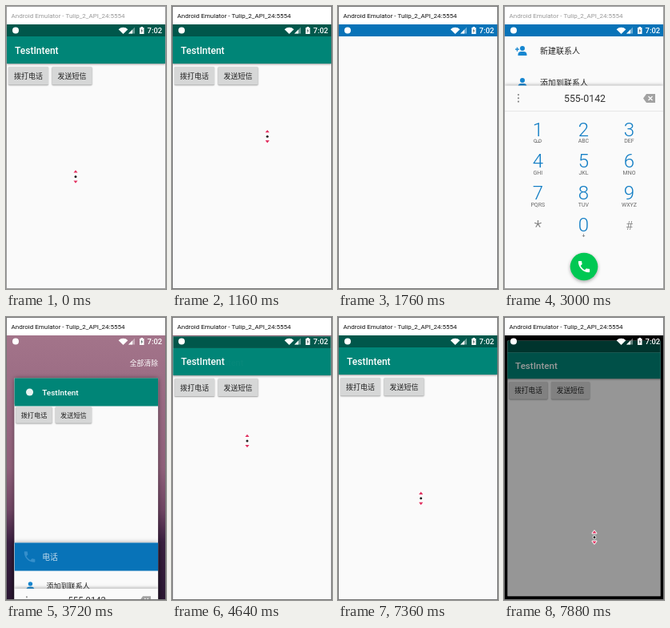
Recreate the animation shown at these times as an HTML page with a canvas. Size 200 by 354 pixels, loop 8000 ms.

```html
<!DOCTYPE html>
<html lang="zh">
<head>
<meta charset="utf-8">
<style>
html, body { margin: 0; width: 100%; height: 100%; overflow: hidden; background: #fff; }
canvas { display: block; width: 200px; height: 354px; }
</style>
</head>
<body>
<canvas id="stage"></canvas>
<script>
const LOOP = 8000, W = 200, H = 354;
const canvas = document.getElementById('stage');
const ctx = canvas.getContext('2d');
const dpr = window.devicePixelRatio || 1;
canvas.width = W * dpr;
canvas.height = H * dpr;

const LATIN = 'Roboto, sans-serif';
const CJK = '"Noto Sans CJK SC", "Noto Sans CJK", "Noto Sans CJK JP", sans-serif';
const CALL = new Path2D('M6.6 10.8c1.4 2.8 3.8 5.1 6.6 6.6l2.2-2.2c.3-.3.7-.4 1-.2 1.1.4 2.3.6 3.6.6.6 0 1 .4 1 1V20c0 .6-.4 1-1 1C10.6 21 3 13.4 3 4c0-.6.4-1 1-1h3.5c.6 0 1 .4 1 1 0 1.2.2 2.5.6 3.6.1.3 0 .7-.3 1z');

// Each stretch holds its pictures for 80 ms, counted from its own start.
const STRETCHES = [0, 440, 1440, 3000, 4000, 5400, 6960, 7880];

// Pointer keys: time, x, y
const POINTER = [
  [0, 87, 213.5], [79, 87, 213.5], [80, 60, 140], [160, 46, 104], [439, 46, 104],
  [520, 44, 88], [840, 44, 88], [1240, 138, 182], [1440, 149, 190], [1640, 212, 215],
  [3720, 212, 235], [4080, 94, 155], [4640, 94, 155], [5040, 71, 83],
  [5200, 81, 82], [5400, 78, 73], [5559, 78, 73], [5640, 78, 84], [6279, 78, 84],
  [6280, 80, 84], [6760, 80, 84], [7280, 102, 218], [7800, 113, 275.5], [8000, 113, 275.5]
];

const clamp = v => Math.max(0, Math.min(1, v));
const span = (t, from, to) => clamp((t - from) / (to - from));
const mix = (a, b, p) => a + (b - a) * p;
const easeOut = p => 1 - (1 - p) ** 3;
const easeInOut = p => p < .5 ? 4 * p ** 3 : 1 - 4 * (1 - p) ** 3;

function holdTime(t) {
  const start = STRETCHES.filter(s => s <= t).pop();
  return Math.min(7880, start + Math.floor((t - start) / 80) * 80);
}

function rect(x, y, w, h, color) {
  ctx.fillStyle = color;
  ctx.fillRect(x, y, w, h);
}

function circle(x, y, r, color) {
  ctx.fillStyle = color;
  ctx.beginPath();
  ctx.arc(x, y, r, 0, Math.PI * 2);
  ctx.fill();
}

function polygon(points, color) {
  ctx.fillStyle = color;
  ctx.beginPath();
  points.forEach(([x, y]) => ctx.lineTo(x, y));
  ctx.closePath();
  ctx.fill();
}

function text(str, x, y, font, color, align = 'left') {
  ctx.font = font;
  ctx.fillStyle = color;
  ctx.textAlign = align;
  ctx.fillText(str, x, y);
}

function group(draw, alpha = 1) {
  ctx.save();
  ctx.globalAlpha *= alpha;
  draw();
  ctx.restore();
}

function withShadow(blur, y, alpha, draw) {
  group(() => {
    ctx.shadowColor = `rgba(0,0,0,${alpha})`;
    ctx.shadowBlur = blur * dpr;
    ctx.shadowOffsetY = y * dpr;
    draw();
  });
}

// Places a full-screen window with its top left corner at x, y.
function place(x, y, scale, draw) {
  group(() => {
    ctx.translate(x, y);
    ctx.scale(scale, scale);
    ctx.translate(-1, -23);
    draw();
  });
}

function callIcon(x, y, size, color) {
  group(() => {
    ctx.translate(x - size / 2, y - size / 2);
    ctx.scale(size / 24, size / 24);
    ctx.fillStyle = color;
    ctx.fill(CALL);
  });
}

function button(x, label, ripple) {
  group(() => {
    ctx.beginPath();
    ctx.roundRect(x, 76, 50, 22.5, 1.2);
    withShadow(1.5, .8, .4, () => { ctx.fillStyle = '#d6d7d7'; ctx.fill(); });
    ctx.clip();
    if (ripple) circle(ripple.x, ripple.y, ripple.r, `rgba(0,0,0,${ripple.alpha})`);
  });
  text(label, x + 25, 90.8, `9px ${CJK}`, '#222', 'center');
}

function rippleAt(t, press, release, x, y) {
  if (t < press || t > release + 480) return null;
  const spread = span(t, release, release + 240);
  return {
    x, y,
    r: mix(9.5 * span(t, press - 80, press + 80), 50, spread),
    alpha: .16 * (1 - span(t, release + 200, release + 480))
  };
}

function testApp(t) {
  rect(1, 23, 198, 331, '#fafafa');
  rect(1, 23, 198, 15, '#00574b');
  withShadow(2, 1, .4, () => rect(1, 38, 198, 34, '#008577'));
  text('TestIntent', 11, 59.5, `500 12px ${LATIN}`, '#fff');
  button(3, '拨打电话', rippleAt(t, 520, 600, 44, 88));
  button(57.5, '发送短信', rippleAt(t, 6280, 6520, 79.5, 84));
}

function person(x, y, plus) {
  const blue = '#1686d0';
  circle(x, y - 3, 3, blue);
  ctx.beginPath();
  ctx.roundRect(x - 5.5, y + 1, 11, 5, [4, 4, 0, 0]);
  ctx.fill();
  if (plus) {
    rect(x - 9, y - 2.5, 5, 1.3, blue);
    rect(x - 7.2, y - 4.3, 1.3, 5, blue);
  }
}

function keypad() {
  const letters = ['', 'ABC', 'DEF', 'GHI', 'JKL', 'MNO', 'PQRS', 'TUV', 'WXYZ', '', '+', ''];
  [...'123456789*0#'].forEach((key, i) => {
    const x = 42.3 + (i % 3) * 57.1, y = 162.5 + Math.floor(i / 3) * 39.8;
    if (key === '*') text(key, x, y + 2, `300 22px ${LATIN}`, '#777', 'center');
    else if (key === '#') text(key, x, y - 2, `300 15px ${LATIN}`, '#777', 'center');
    else text(key, x, y, `300 24px ${LATIN}`, '#0f7cc4', 'center');
    text(letters[i], x, y + 8.5, `7px ${LATIN}`, '#666', 'center');
  });
  ctx.strokeStyle = '#777';
  ctx.lineWidth = .8;
  ctx.beginPath();
  ctx.arc(39, 168.7, 1.8, 0, 7);
  ctx.moveTo(46.8, 168.7);
  ctx.arc(45, 168.7, 1.8, 0, 7);
  ctx.moveTo(39, 170.5);
  ctx.lineTo(45, 170.5);
  ctx.stroke();
}

function dialer(t) {
  const shown = span(t, 2240, 2480);
  rect(1, 23, 198, 331, '#fafafa');
  rect(1, 23, 198, 15, '#0873b8');
  if (!shown) return;
  group(() => {
    person(23, 56, true);
    text('新建联系人', 45, 60, `10px ${CJK}`, '#222');
    person(23, 96, false);
    text('添加到联系人', 45, 100, `10px ${CJK}`, '#222');
    withShadow(4, -1, .35, () => rect(1, 99.5, 198, 254.5, '#fafafa'));
    rect(1, 131, 198, .8, '#e2e2e2');
    [111, 115.3, 119.6].forEach(y => circle(18, y, 1.1, '#888'));
    text('555-0142', 101, 120, `12.4px ${LATIN}`, '#333', 'center');
    polygon([[174, 115.5], [178, 110], [189, 110], [189, 121], [178, 121]], '#a2a2a2');
    ctx.strokeStyle = '#fff';
    ctx.lineWidth = 1.2;
    ctx.beginPath();
    ctx.moveTo(180.5, 113); ctx.lineTo(185.5, 118);
    ctx.moveTo(185.5, 113); ctx.lineTo(180.5, 118);
    ctx.stroke();
    keypad();
    withShadow(4, 1.5, .35, () => circle(100, 326, 17.3 * shown, '#00c853'));
    callIcon(100, 326, 19 * shown, '#fff');
  }, shown);
}

// Overview card: a window whose top strip gives way to a coloured header.
const HEAD_TOP = 13.5, HEAD_BOTTOM = 52;

function card(x, y, scale, amount, head, drawWindow) {
  place(x, y, scale, () => {
    const top = 23 + HEAD_TOP * amount;
    withShadow(6, 0, .5, () => rect(1, top, 198, 400, '#fafafa'));
    ctx.beginPath();
    ctx.rect(1, top, 198, 400);
    ctx.clip();
    drawWindow();
    group(() => {
      const middle = 23 + (HEAD_TOP + HEAD_BOTTOM) / 2;
      rect(1, 23 + HEAD_TOP, 198, HEAD_BOTTOM - HEAD_TOP, head.color);
      head.icon(middle);
      text(head.title, 39.3, middle + 4, head.font, head.ink);
    }, amount);
  });
}

const TEST_HEAD = {
  color: '#008577', title: 'TestIntent', font: `500 11px ${LATIN}`, ink: '#fff',
  icon: y => circle(22, y, 5, '#e6f2f0')
};
const DIAL_HEAD = {
  color: '#0873b8', title: '电话', font: `10.8px ${CJK}`, ink: '#c3dcec',
  icon: y => callIcon(22, y, 20, '#358fcb')
};

function wallpaper() {
  const fade = ctx.createLinearGradient(0, 23, 0, H);
  fade.addColorStop(0, '#a3748a');
  fade.addColorStop(.5, '#8f607a');
  fade.addColorStop(.66, '#6f4563');
  fade.addColorStop(.78, '#3a1f40');
  fade.addColorStop(1, '#2a1632');
  rect(1, 23, 198, 331, fade);
}

function overview(t) {
  const open = easeOut(span(t, 3360, 3760));
  const launch = easeInOut(span(t, 4280, 4720));
  wallpaper();
  text('全部清除', 190, 60.5, `8.8px ${CJK}`, `rgba(255,255,255,${open * (1 - launch)})`, 'right');
  const testCard = () => card(mix(10.5, 1, launch), mix(64.3, 23, launch), mix(.907, 1, launch),
    1 - launch, TEST_HEAD, () => testApp(t));
  group(testCard, open);
  if (launch < 1) {
    card(mix(1, 10.5, open), mix(23, 270.6, open) + launch * 110, mix(1, .907, open),
      open, DIAL_HEAD, () => dialer(t));
  }
}

// The test app sinks back, then the dialer slides in over it.
function switchApp(t, start) {
  const age = t - start;
  const back = clamp(age / 160);
  const scale = 1 - .091 * back ** 1.38;
  rect(1, 23, 198, 331, '#000');
  place(100 - 99 * scale, 188.5 - 165.5 * scale + 16 * back ** 4, scale, () => {
    testApp(t);
    rect(1, 23, 198, 331, `rgba(0,0,0,${.4 * clamp(age / 60)})`);
  });
  const slide = easeOut(span(age, 97, 480));
  if (slide > 0) {
    group(() => place(1, 23 + 331 * (1 - slide), 1, () => dialer(t)), span(age, 80, 187));
  }
}

function statusIcons() {
  circle(12, 30.5, 4, '#fff');
  ctx.fillStyle = '#fff';
  ctx.beginPath();
  ctx.moveTo(146.5, 35);
  ctx.arc(146.5, 35, 8.3, -Math.PI * .75, -Math.PI * .25);
  ctx.fill();
  polygon([[153, 34.5], [161, 26.5], [161, 34.5]], 'rgba(255,255,255,.4)');
  polygon([[153, 34.5], [158, 29.5], [158, 34.5]], '#fff');
  rect(167, 27, 5.5, 8, '#fff');
  rect(168.5, 26, 2.5, 1, '#fff');
  polygon([[170.3, 28], [168.3, 31.5], [169.6, 31.5], [169.2, 34], [171.2, 30.5], [169.9, 30.5]], '#566');
  text('7:02', 176.5, 34, `500 9.5px ${LATIN}`, '#fff');
}

function frame(active) {
  rect(0, 0, W, 23, '#fff');
  text('Android Emulator - Tulip_2_API_24:5554', 6.5, 14.5, `8px ${LATIN}`, active ? '#111' : '#999');
  ctx.strokeStyle = active ? '#777' : '#999';
  ctx.lineWidth = 1;
  ctx.strokeRect(.5, .5, W - 1, H - 1);
}

function pointer(t) {
  const next = POINTER.findIndex(key => key[0] > t);
  const [t0, x0, y0] = POINTER[next - 1], [t1, x1, y1] = POINTER[next];
  const p = span(t, t0, t1);
  group(() => {
    ctx.translate(mix(x0, x1, p), mix(y0, y1, p));
    ctx.strokeStyle = '#fff';
    ctx.lineWidth = 1.6;
    ctx.lineJoin = 'round';
    for (const side of [-1, 1]) {
      ctx.beginPath();
      ctx.moveTo(0, side * 8.3);
      ctx.lineTo(-2.6, side * 4.9);
      ctx.lineTo(2.6, side * 4.9);
      ctx.closePath();
      ctx.stroke();
      ctx.fillStyle = '#e0305f';
      ctx.fill();
    }
    circle(0, 0, 2.3, '#fff');
    circle(0, 0, 1.5, '#222');
  });
}

function render(t) {
  ctx.setTransform(dpr, 0, 0, dpr, 0, 0);
  if (t < 1280) testApp(t);
  else if (t < 1760) switchApp(t, 1280);
  else if (t < 3400) dialer(t);
  else if (t < 4720) overview(t);
  else if (t < 7800) testApp(t);
  else switchApp(t, 7800);
  statusIcons();
  frame(t >= 520 && !(t >= 3000 && t < 3080));
  pointer(t);
}

function tick() {
  render(holdTime(performance.now() % LOOP));
  requestAnimationFrame(tick);
}
tick();
</script>
</body>
</html>
```
